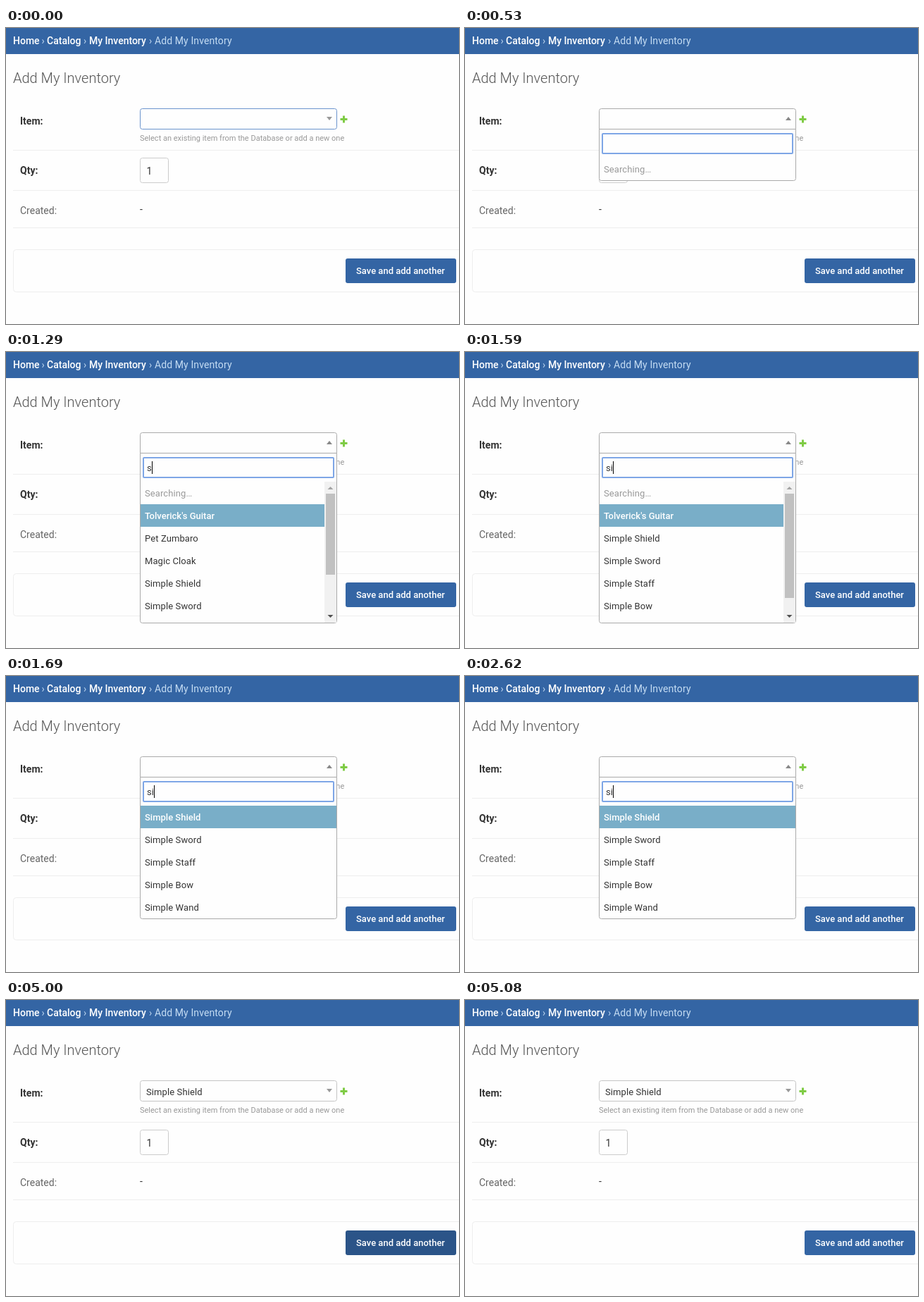
Animation of 643 by 420 pixels, one loop 5800 ms. Source, as an HTML page:

```html
<!DOCTYPE html>
<html lang="en">
<head>
<meta charset="utf-8">
<title>Add My Inventory</title>
<style>
  html, body { margin: 0; width: 100%; height: 100%; overflow: hidden; background: #fefefe; }
  svg { display: block; width: 643px; height: 420px; font: 14px Roboto, Arial, sans-serif; }
  text { white-space: pre; fill: #333; }
  .crumb { font-weight: 500; fill: #fff; }
  .here { font-weight: 400; fill: #c4dcf3; }
  .title { font-size: 20px; font-weight: 300; fill: #555; }
  .label { font-weight: 700; }
  .soft { fill: #666; }
  .help { font-size: 11px; fill: #999; }
  .small { font-size: 13px; letter-spacing: .1px; }
  .picked, .save { font-size: 13px; font-weight: 500; fill: #fff; }
  .hint { fill: #999; }
  .rule { fill: none; stroke: #eee; }
  .box { fill: #fefefe; stroke: #ccc; }
  .panel { fill: #fefefe; stroke: #aaa; }
  .focus { fill: #fefefe; stroke: #7ea6e6; stroke-width: 2; }
  .press { fill: #3465a4; animation: press 5.8s step-end infinite; }
  @keyframes press {
    0% { fill: #3465a4; }
    86.207% { fill: #2b5488; }
    87.586% { fill: #3465a4; }
  }
</style>
</head>
<body>
<svg viewBox="0 0 643 420">
  <rect width="643" height="37" fill="#3465a4"/>
  <g class="crumbs">
    <text class="crumb" x="10" y="23">Home</text>
    <text class="crumb here" x="50.5" y="23">›</text>
    <text class="crumb" x="58" y="23">Catalog</text>
    <text class="crumb here" x="110" y="23">›</text>
    <text class="crumb" x="118" y="23">My Inventory</text>
    <text class="crumb here" x="203" y="23">›</text>
    <text class="crumb here" x="211" y="23" letter-spacing=".1">Add My Inventory</text>
  </g>
  <text class="title" x="10" y="78">Add My Inventory</text>

  <path class="rule" d="M10 173.5H643M10 230.5H643M10 283.5H643"/>
  <rect class="rule" x="10.5" y="314.5" width="660" height="60" rx="4"/>

  <text class="label" x="20" y="137">Item:</text>
  <text class="label" x="20" y="207">Qty:</text>
  <text class="soft" x="20" y="264">Created:</text>
  <text class="help" x="190" y="160">Select an existing item from the Database or add a new one</text>
  <path d="M474.5 129.5h10M479.5 124.5v10" stroke="#7fcb45" stroke-width="3"/>

  <rect class="box" x="190.5" y="184.5" width="40" height="35" rx="3"/>
  <text x="199.5" y="208">1</text>
  <text x="190" y="262">-</text>

  <rect class="press" x="482" y="327" width="157" height="35" rx="3"/>
  <text class="save" x="497" y="349">Save and add another</text>

  <g id="picker"></g>
</svg>
<script>
const LOOP = 5800, ROW = 32, TOP = 184, VIEW = 200;
const picker = document.getElementById('picker');

const simple = ['Shield', 'Sword', 'Staff', 'Bow', 'Wand'].map(n => 'Simple ' + n);
const guitar = "Tolverick's Guitar";
const all = [guitar, 'Pet Zumbaro', 'Magic Cloak', ...simple];
const withS = [guitar, ...simple];

// Each state holds from its start time until the next one.
const states = [
  { at: 0, border: '#6a93cd' },
  { at: 500, open: true, query: '', items: [], busy: true },
  { at: 550, open: true, query: '', items: [], busy: true, caret: true },
  { at: 610, open: true, query: '', items: all, caret: true },
  { at: 1050, open: true, query: '', items: all },
  { at: 1290, open: true, query: 's', items: all, busy: true, caret: true },
  { at: 1390, open: true, query: 's', items: withS, caret: true },
  { at: 1590, open: true, query: 'si', items: withS, busy: true, caret: true },
  { at: 1690, open: true, query: 'si', items: simple, caret: true },
  { at: 2130, open: true, query: 'si', items: simple },
  { at: 2620, open: true, query: 'si', items: simple, caret: true },
  { at: 3160, open: true, query: 'si', items: simple },
  { at: 3360, border: '#aaa', value: simple[0] },
  { at: 3440, border: '#c4c4c4', value: simple[0] }
];
const caretX = [200, 207, 210];

const rect = (x, y, w, h, fill) =>
  `<rect x="${x}" y="${y}" width="${w}" height="${h}" fill="${fill}"/>`;
const text = (x, y, cls, str) => `<text x="${x}" y="${y}" class="${cls}">${str}</text>`;
const shape = (d, fill) => `<path d="${d}" fill="${fill}"/>`;

function closedView({ border, value = '' }) {
  return `<rect class="box" style="stroke:${border}" x="190.5" y="114.5" width="279" height="29" rx="3"/>` +
    shape('M455 126h8l-4 5z', '#999') + text(199, 135, 'small', value);
}

function scrollbar(rows) {
  const thumb = 166 * VIEW / (rows * ROW);
  return rect(452, TOP, 17, VIEW, '#f1f1f1') +
    rect(454, 201, 13, Math.round(thumb), '#c1c1c1') +
    shape('M456.5 195h8l-4 -4z', '#a3a3a3') +
    shape('M456.5 373h8l-4 4z', '#505050');
}

function openView({ query, items, busy, caret }) {
  const rows = items.length + (busy ? 1 : 0);
  const height = Math.min(rows * ROW, VIEW);
  const scrolls = rows * ROW > VIEW;
  const end = TOP + height + .5;
  let out = '<path class="panel" d="M190.5 143.5V117.5q0 -3 3 -3H466.5q3 0 3 3V143.5z"/>' +
    shape('M455 131h8l-4 -5z', '#888') +
    `<path class="panel" d="M190.5 143.5H469.5V${end - 3}q0 3 -3 3H193.5q-3 0 -3 -3z"/>` +
    '<rect class="focus" x="195" y="150" width="270" height="28" rx="1"/>' +
    text(200, 169, 'small', query);
  if (caret) out += rect(caretX[query.length], 155, 1, 18, '#000');
  if (busy) out += text(197, TOP + 21, 'small hint', 'Searching…');
  items.forEach((item, i) => {
    const y = TOP + (i + (busy ? 1 : 0)) * ROW;
    if (y + 21 > TOP + VIEW) return;
    if (i === 0) out += rect(191, y, scrolls ? 261 : 278, ROW, '#79aec8');
    out += text(197, y + 21, i ? 'small' : 'picked', item);
  });
  return out + (scrolls ? scrollbar(rows) : '');
}

let shown;
function draw(now) {
  const t = now % LOOP;
  const state = states.findLast(s => s.at <= t);
  if (state !== shown) {
    shown = state;
    picker.innerHTML = state.open ? openView(state) : closedView(state);
  }
  requestAnimationFrame(draw);
}
draw(0);
</script>
</body>
</html>
```
